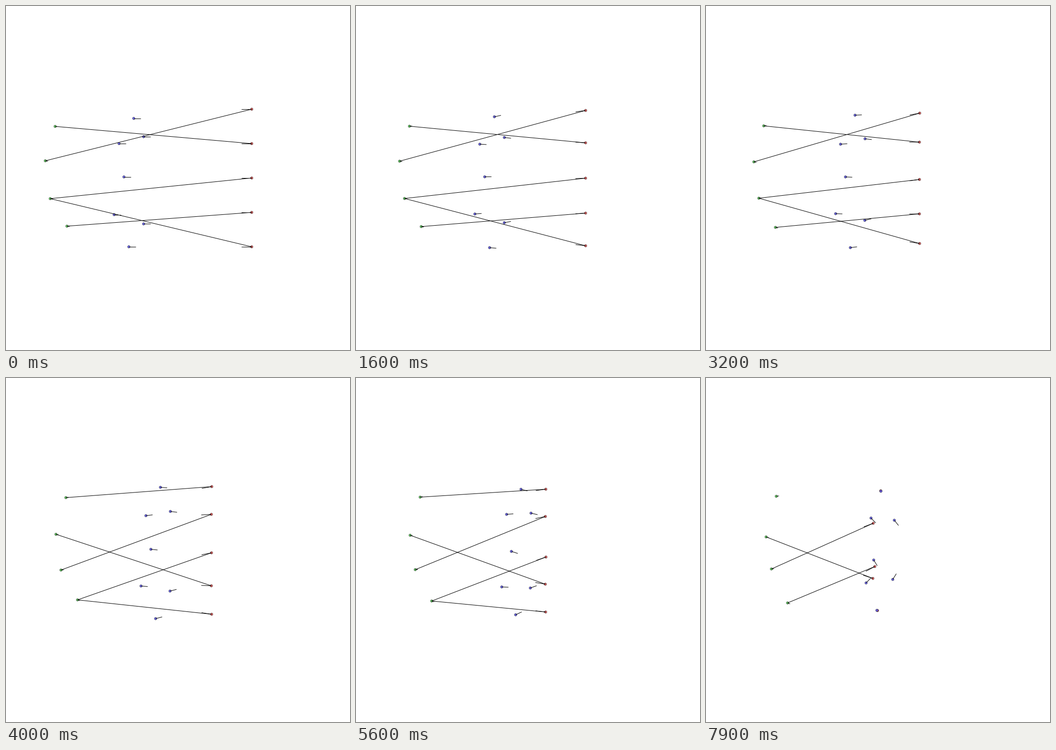
Write a matplotlib script that moves like this. It is 700 by 700 pixels and loops after 8 s.

```python
import numpy as np
import matplotlib.pyplot as plt
from matplotlib.animation import FuncAnimation
from matplotlib.collections import LineCollection

SIZE, DPI = 700, 100
FRAMES, STEP_MS = 80, 100
PX = 72 / DPI                    # one pixel in points
SWITCH = 40                      # step at which links are reassigned
REACH = 3                        # distance at which blue catches red
KEYS = np.array([32, 64, 79]) / (FRAMES - 1)
STEPS = np.arange(FRAMES)
U = STEPS / (FRAMES - 1)

# Each agent: start x, start y, then how far it has strayed in y at each key time
REDS = [
    (500, 210, 8, 18.3, 20.5),
    (500, 280, -3, 5.7, 15.6),
    (500, 350, 3, 20.2, 33.6),
    (500, 420, 3, -3.7, -12.2),
    (500, 490, -6.7, -15.5, -17),
]
BLUES = [
    (260, 228.7, -6.5, 0.3, 0.6),
    (280, 266, 4.2, 12.1, 23.4),
    (230, 280, 1.2, -2.6, 5),
    (240, 347.8, 0, 9.2, 22.6),
    (220, 424.6, -2, 0.3, -7.6),
    (280, 443.4, -7.2, -20.4, -33.5),
    (250, 490, 1.7, -12.8, -18),
]
# Greens stray steadily: start x, start y, total drift
GREENS = [(100, 245, -4.3), (80, 315, 8.4), (90, 392, -3.4), (124, 448, 9.7)]

# Green partner of each red
LINKS_BEFORE = [1, 0, 2, 3, 2]
LINKS_AFTER = [0, 2, 3, 1, 3]


def sway(*offsets):
    """Smooth drift with a level start, passing through the key offsets."""
    return U**2 * np.polyval(np.polyfit(KEYS, offsets / KEYS**2, 2), U)


def track(x0, y, speed):
    """Position and velocity per step when moving at constant speed."""
    vy = np.gradient(y)
    vy[0] = 0
    vx = np.sign(speed) * np.sqrt(speed**2 - np.minimum(vy**2, 0.9 * speed**2))
    x = x0 + np.concatenate([[0], np.cumsum(vx[1:])])
    return np.column_stack([x, y]), np.column_stack([vx, vy])


def build():
    reds = [track(x, y + sway(*d), -2.055) for x, y, *d in REDS]
    blues = [track(x, y + sway(*d), 1.37) for x, y, *d in BLUES]
    greens = [track(x, y + d * U**1.5, 0.548) for x, y, d in GREENS]
    for rp, rv in reds:
        for bp, bv in blues:
            hits = np.flatnonzero(np.hypot(*(rp - bp).T) < REACH)
            if hits.size:
                n = hits[0]
                for p, v in ((rp, rv), (bp, bv)):
                    p[n:] = p[n]
                    v[n:] = 0
    pos, vel = zip(*reds, *blues, *greens)
    return np.array(pos), np.array(vel)


pos, vel = build()
first_green = len(REDS) + len(BLUES)

fig = plt.figure(figsize=(SIZE / DPI, SIZE / DPI), dpi=DPI, facecolor="white")
ax = fig.add_axes([0, 0, 1, 1])
ax.set_xlim(0, SIZE)
ax.set_ylim(SIZE, 0)
ax.axis("off")

colors = ([(0.9, 0.35, 0.35, 0.9)] * len(REDS)
          + [(0.38, 0.36, 0.93, 0.9)] * len(BLUES)
          + [(0.35, 0.8, 0.35, 0.9)] * len(GREENS))
dots = ax.scatter(pos[:, 0, 0], pos[:, 0, 1], s=(5 * PX) ** 2, c=colors,
                  edgecolors=[(0, 0, 0, 0.5)], linewidths=PX, zorder=1)
lines = ax.add_collection(LineCollection([], colors="black", linewidths=PX, zorder=2))


def draw(i):
    p, v = pos[:, i], vel[:, i]
    links = LINKS_BEFORE if i < SWITCH else LINKS_AFTER
    segs = [(a, a + 10 * b) for a, b in zip(p, v) if b.any()]
    segs += [(p[first_green + g], p[r]) for r, g in enumerate(links) if v[r].any()]
    dots.set_offsets(p)
    lines.set_segments(segs)
    return dots, lines


anim = FuncAnimation(fig, draw, frames=FRAMES, interval=STEP_MS,
                     repeat=True, repeat_delay=0, blit=False)
plt.show()
```
